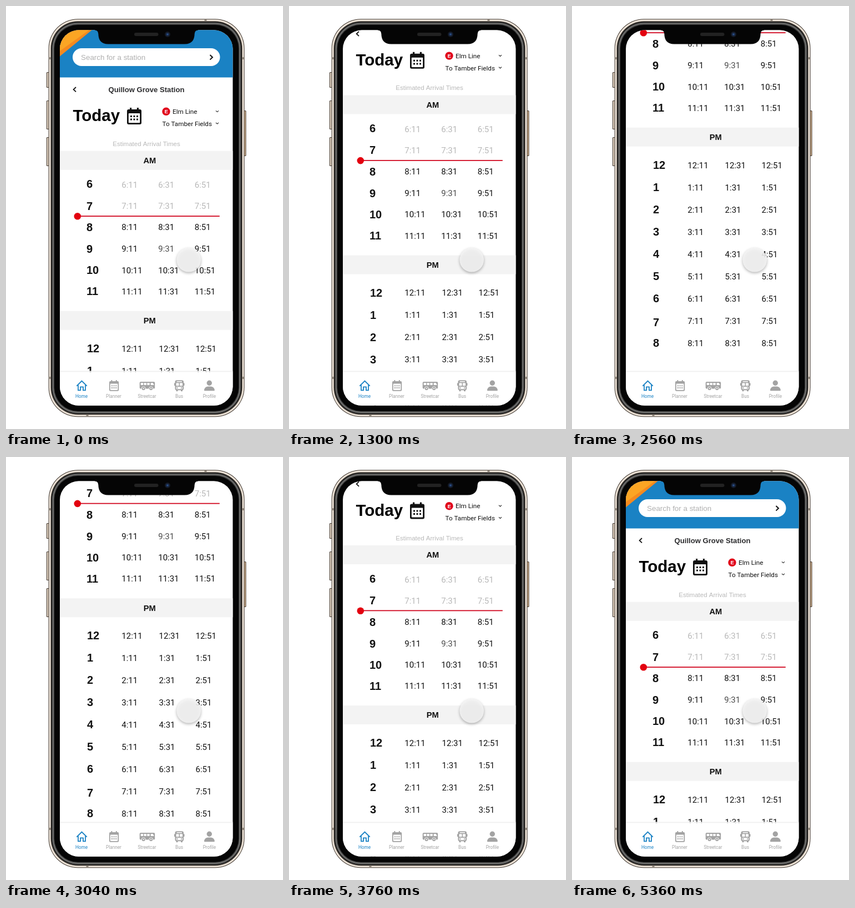
Write an HTML page with a canvas that moves like this. It is 499x761 px and loops after 5.54 s.

```html
<!DOCTYPE html>
<html lang="en">
<head>
<meta charset="utf-8">
<title>Timetable</title>
<style>
html, body { margin: 0; width: 100%; height: 100%; overflow: hidden; background: #fff; }
canvas { display: block; width: 499px; height: 761px; }
</style>
</head>
<body>
<canvas id="stage"></canvas>
<script>
const W = 499, H = 761, LOOP = 5540;
const canvas = document.getElementById('stage');
const ctx = canvas.getContext('2d');
const dpr = window.devicePixelRatio || 1;
canvas.width = Math.round(W * dpr);
canvas.height = Math.round(H * dpr);

const ARIAL = '"Liberation Sans", Arial, sans-serif';
const ROBOTO = 'Roboto, sans-serif';
const BLUE = '#1a82c4', INK = '#111', PALE = '#b8b8b8', ICON = '#a3a3a3';

// time, scroll offset, speed in px per ms
const KEYS = [
  [660, 0, 0], [1300, 100, 0.2], [1940, 247, 0.19], [2560, 330, 0],
  [2680, 330, 0], [3380, 219, -0.25], [4140, 19, -0.07], [4920, 0, 0]
];

function scrollAt(t) {
  const i = KEYS.findIndex(k => t < k[0]);
  if (i < 1) return 0;
  const [t0, y0, v0] = KEYS[i - 1], [t1, y1, v1] = KEYS[i];
  const d = t1 - t0, u = (t - t0) / d, w = 1 - u;
  return y0 * w * w * (1 + 2 * u) + y1 * u * u * (3 - 2 * u)
    + d * u * w * (v0 * w - v1 * u);
}

function text(str, x, y, font, color, align = 'left') {
  ctx.font = font;
  ctx.fillStyle = color;
  ctx.textAlign = align;
  ctx.fillText(str, x, y);
}

function box(x, y, w, h, r, color) {
  ctx.beginPath();
  ctx.roundRect(x, y, w, h, r);
  ctx.fillStyle = color;
  ctx.fill();
}

function disc(x, y, r, color) {
  ctx.beginPath();
  ctx.arc(x, y, r, 0, 7);
  ctx.fillStyle = color;
  ctx.fill();
}

function poly(pts, color, width) {
  ctx.beginPath();
  pts.forEach(([x, y]) => ctx.lineTo(x, y));
  if (width) {
    ctx.strokeStyle = color;
    ctx.lineWidth = width;
    ctx.stroke();
  } else {
    ctx.fillStyle = color;
    ctx.fill();
  }
}

function calendar(x, y, s, color) {
  ctx.save();
  ctx.translate(x, y);
  ctx.scale(s, s);
  box(0, 3, 26, 27, 3, color);
  box(5, 0, 3.2, 6, 0.5, color);
  box(17.8, 0, 3.2, 6, 0.5, color);
  box(2.8, 10, 20.4, 17.2, 1, '#fff');
  for (let r = 0; r < 2; r++)
    for (let c = 0; c < 3; c++) box(6 + c * 5.5, 14 + r * 5.6, 3, 3, 0.3, color);
  ctx.restore();
}

function header() {
  box(97, 0, 312, 128.5, 0, BLUE);
  poly([[97, 43], [155, 43], [97, 90.5]], '#f58a1f');
  poly([[97, 43], [150, 43], [97, 81]], '#fba524');
  box(120, 76, 265.5, 32, 16, '#fff');
  text('Search for a station', 135, 97, '13.4px ' + ARIAL, '#b0b0b0');
  poly([[367.5, 88], [372, 92.3], [367.5, 96.6]], '#111', 2);

  poly([[126, 146], [121.6, 150.2], [126, 154.4]], '#111', 1.8);
  text('Quillow Grove Station', 253, 155, 'bold 13.1px ' + ARIAL, '#2c2c2e', 'center');
  text('Today', 120.5, 207.3, 'bold 29.5px ' + ARIAL, '#000');
  calendar(218, 183, 1, '#111');

  disc(288.5, 189.8, 7.2, '#e1001a');
  text('E', 288.6, 193.2, 'bold 9.5px ' + ARIAL, '#fff', 'center');
  text('Elm Line', 300, 194, '11.7px ' + ROBOTO, INK);
  text('To Tamber Fields', 281.5, 216, '11.7px ' + ROBOTO, INK);
  for (const y of [188.3, 209.8])
    poly([[378, y], [380.5, y + 2.3], [383, y]], '#222', 1.1);
  text('Estimated Arrival Times', 253, 251.6, '11.55px ' + ARIAL, '#b9b9b9', 'center');
}

function band(label, y) {
  box(97, y, 312, 34, 0, '#f3f3f3');
  text(label, 258.8, y + 22.3, 'bold 14.7px ' + ARIAL, INK, 'center');
}

function row(hour, x, hourY, timeY, cols, color) {
  text(hour, x, hourY + 7.1, 'bold 20px ' + ARIAL, INK);
  ['11', '31', '51'].forEach((min, i) => {
    const soft = hour === 9 && min === '31';
    text(hour + ':' + min, cols[i], timeY + 5.3, '15px ' + ROBOTO, soft ? '#4a4a4a' : color);
  });
}

function timetable() {
  band('AM', 260.7);
  const amHours = [320, 359.5, 398, 437, 475.2, 513.3];
  const amTimes = [322, 359.8, 398, 437, 475.2, 513.5];
  amHours.forEach((y, i) =>
    row(6 + i, 145, y, amTimes[i], [208.3, 274.2, 339.8], i < 2 ? PALE : INK));
  box(128, 377.2, 256.8, 1.7, 0, '#d0021b');
  disc(128.8, 378.3, 6.3, '#e3000f');

  band('PM', 548.7);
  for (let i = 0; i < 9; i++) {
    const y = 616 + i * 40;
    row(i || 12, 146, i === 7 ? y + 2.7 : y - 0.2, y + 0.4, [208.3, 275.6, 341.5], INK);
  }
}

function bus(x, y) {
  box(x, y, 27.5, 12.5, 2, ICON);
  for (const dx of [2, 7.8, 13.6]) box(x + dx, y + 2, 4.4, 4, 0.4, '#fff');
  poly([[x + 20, y + 2], [x + 24, y + 2], [x + 26, y + 6], [x + 20, y + 6]], '#fff');
  for (const dx of [7, 20.5]) {
    disc(x + dx, y + 12.2, 3.8, '#fff');
    disc(x + dx, y + 12.2, 2.9, ICON);
    disc(x + dx, y + 12.2, 1.1, '#fff');
  }
}

function busFront(x, y) {
  box(x + 1.5, y, 15.5, 18, 3, ICON);
  box(x, y + 5, 18.5, 5, 1, ICON);
  box(x + 3.5, y + 16, 3, 4, 0.8, ICON);
  box(x + 12, y + 16, 3, 4, 0.8, ICON);
  box(x + 4.5, y + 1.8, 9.5, 1.3, 0.5, '#fff');
  box(x + 3.5, y + 5, 5, 5, 0.5, '#fff');
  box(x + 10, y + 5, 5, 5, 0.5, '#fff');
  box(x + 3.5, y + 11.8, 11.5, 4.2, 0.8, '#fff');
  disc(x + 5.5, y + 13.8, 1.2, ICON);
  disc(x + 13, y + 13.8, 1.2, ICON);
}

function navBar() {
  box(97, 656.6, 312, 2, 0, '#f0f0f0');
  box(97, 658.4, 312, 61, 0, '#fff');
  poly([[130, 682], [130, 691.3], [134, 691.3], [134, 685.3], [139, 685.3],
    [139, 691.3], [143, 691.3], [143, 682]], BLUE, 1.8);
  poly([[127.3, 683.6], [136.5, 674.6], [145.7, 683.6]], BLUE, 1.9);
  calendar(186, 673, 0.66, ICON);
  bus(240.7, 676);
  busFront(303, 673.3);
  disc(366.3, 678.2, 4.7, ICON);
  box(357, 684.4, 18.8, 7.8, [8, 8, 1, 1], ICON);
  const tabs = [['Home', 136], ['Planner', 194], ['Streetcar', 254], ['Bus', 312], ['Profile', 366.4]];
  tabs.forEach(([name, x], i) =>
    text(name, x, 704.6, '8.2px ' + ROBOTO, i ? ICON : BLUE, 'center'));
}

function phoneBody() {
  for (const [y, h] of [[119, 28], [170, 52], [236, 52]]) {
    box(72.8, y, 6, h, 1.5, '#4b4138');
    box(73.8, y + 1, 4, h - 2, 1, '#d3c5b5');
  }
  box(427, 188, 5.6, 82, 1.5, '#4b4138');
  box(428, 189, 3.6, 80, 1, '#c8a987');

  const layers = [
    [0, '#40372f'], [1, '#eee5da'], [3.6, '#a79b8e'], [4.5, '#191817'],
    [6.3, '#4c4c4c'], [7.6, '#747472'], [9.2, '#3a3a3a'], [10.6, '#050505']
  ];
  for (const [d, color] of layers)
    box(76.6 + d, 23.3 + d, 353 - 2 * d, 716 - 2 * d, 53 - d, color);

  for (const y of [92, 667]) {
    box(77, y, 4, 4, 0, '#8f857a');
    box(425.2, y, 4, 4, 0, '#8f857a');
  }
  box(357.5, 23.8, 4, 4, 0, '#8f857a');
  box(144.5, 734.8, 4, 4, 0, '#8f857a');
}

function notch() {
  ctx.beginPath();
  ctx.moveTo(160, 42);
  ctx.lineTo(160, 43.4);
  ctx.quadraticCurveTo(166, 43.6, 166.3, 50);
  ctx.bezierCurveTo(166.6, 62, 172, 68.5, 184, 68.5);
  ctx.lineTo(322, 68.5);
  ctx.bezierCurveTo(334, 68.5, 339.4, 62, 339.7, 50);
  ctx.quadraticCurveTo(340, 43.6, 346, 43.4);
  ctx.lineTo(346, 42);
  ctx.fillStyle = '#050505';
  ctx.fill();
  box(231, 48, 43.5, 6, 3, '#222');
  disc(291, 51, 5, '#141a26');
  disc(291, 51, 2.8, '#1d3358');
  disc(291, 51, 1.2, '#2f5690');
}

function pointer() {
  ctx.save();
  ctx.shadowColor = 'rgba(0,0,0,0.34)';
  ctx.shadowBlur = 5 * dpr;
  ctx.shadowOffsetY = 2 * dpr;
  disc(329.2, 456.8, 21.8, 'rgba(246,246,246,0.86)');
  ctx.restore();
}

function draw(t) {
  ctx.setTransform(dpr, 0, 0, dpr, 0, 0);
  ctx.fillStyle = '#fff';
  ctx.fillRect(0, 0, W, H);
  phoneBody();

  ctx.save();
  ctx.beginPath();
  ctx.roundRect(97, 43.3, 311.5, 675.5, 34);
  ctx.clip();
  ctx.fillStyle = '#fff';
  ctx.fillRect(97, 43, 312, 677);
  ctx.save();
  ctx.translate(0, -scrollAt(t));
  header();
  timetable();
  ctx.restore();
  navBar();
  ctx.restore();

  notch();
  pointer();
}

const start = performance.now();
function tick() {
  draw((performance.now() - start) % LOOP);
  requestAnimationFrame(tick);
}
tick();
</script>
</body>
</html>
```
